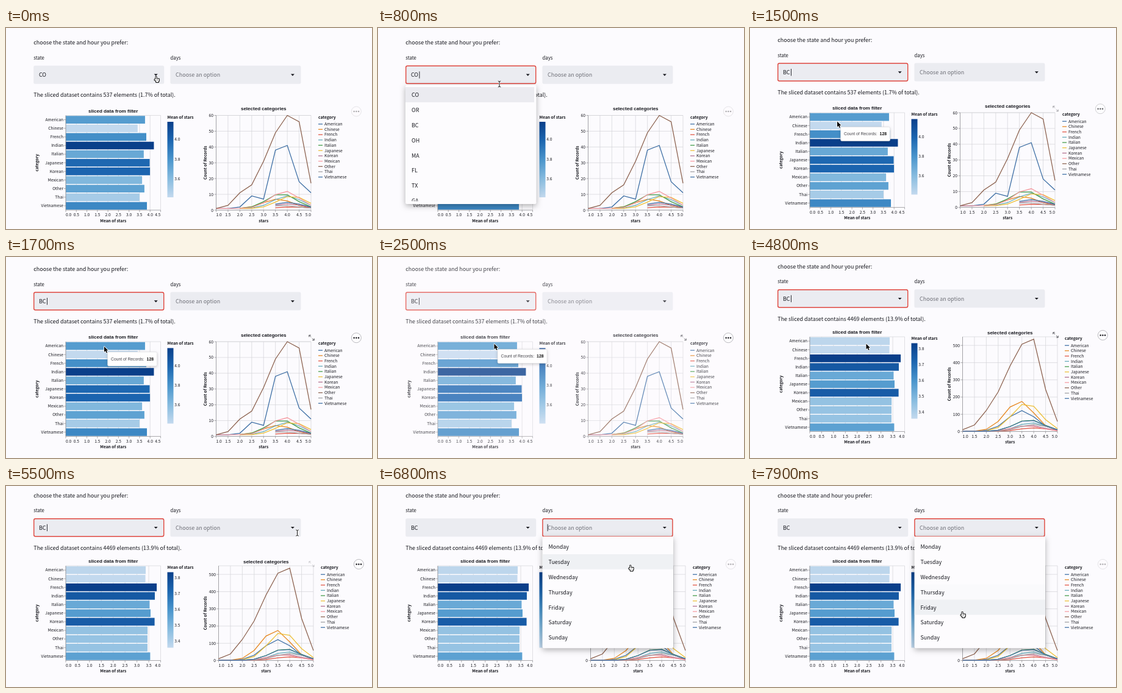
Write an HTML page with a canvas that moves like this. It is 600 px wide and 330 px high and loops after 8 s.

```html
<!DOCTYPE html>
<html lang="en">
<head>
<meta charset="utf-8">
<title>Restaurant dashboard</title>
<style>
html, body { margin: 0; width: 100%; height: 100%; overflow: hidden; background: #fcfbfe; }
canvas { display: block; width: 600px; height: 330px; }
</style>
</head>
<body>
<canvas id="stage"></canvas>
<script>
const W = 600, H = 330, LOOP = 8000, STEP = 100;
const canvas = document.getElementById('stage');
const ctx = canvas.getContext('2d');
const ratio = window.devicePixelRatio || 1;
canvas.width = W * ratio;
canvas.height = H * ratio;

const SANS = '"Noto Sans CJK JP", "Noto Sans CJK SC", "Noto Sans CJK KR", "Open Sans", sans-serif';
const ARIAL = '"Liberation Sans", Arial, sans-serif';
const BODY = '8.95px ' + SANS, LABEL = '7.8px ' + SANS;
const SMALL = '6.7px ' + SANS, SMALL_BOLD = 'bold 6.65px ' + SANS;
const TITLE = 'bold 8.05px ' + ARIAL;
const BG = '#fcfbfe', INK = '#16171d', RED = '#e0463e', FIELD = '#ebecf1';
const GRID = '#d3d3d7', AXIS = '#88888c';

const CATS = ['American', 'Chinese', 'French', 'Indian', 'Italian', 'Japanese',
  'Korean', 'Mexican', 'Other', 'Thai', 'Vietnamese'];
const COLORS = ['#3a6ca3', '#e6851c', '#e0513f', '#62a9b8', '#3f9a46',
  '#edbe33', '#b06c8c', '#f799a0', '#8a5f4c', '#9f9fa3'];
const BLUES = ['c3d9ee', '86bbdf', '4a95cc', '1c66b0', '0a3f8a'];
const STATES = ['CO', 'OR', 'BC', 'OH', 'MA', 'FL', 'TX', 'GA'];
const DAYS = ['Monday', 'Tuesday', 'Wednesday', 'Thursday', 'Friday', 'Saturday', 'Sunday'];

// Counts per half star: a bell on a floor of one; rare categories start late.
function bell(amp, peak) {
  const start = amp < 5 ? 5 : amp < 11 ? 2 : 0;
  const points = [];
  for (let i = start; i <= 8; i++) {
    const d = (1 + i / 2 - peak) / 0.85;
    points.push([i, 1 + amp * Math.exp(-d * d)]);
  }
  return points;
}
const counts = (...values) => values.map((v, i) => [i, v]);

const CO = {
  status: 'The sliced dataset contains 537 elements (1.7% of total).',
  means: [3.76, 3.41, 3.82, 4.18, 3.7, 3.98, 3.995, 3.62, 3.73, 3.5, 3.85],
  maxX: 4.5, legend: [4, 3.8, 3.6], maxY: 60, stepY: 10, dx: 0,
  lines: [
    counts(1, 1, 2, 9, 7, 38, 41, 18, 11), bell(6, 3.6), bell(1, 4.2), bell(8, 4), bell(9.5, 3.75),
    bell(8, 4.2), bell(3, 4), bell(11, 3.9), counts(1, 3, 11, 16, 31, 49, 60, 56, 17), bell(2, 3.8), bell(4, 4)
  ]
};
const BC = {
  status: 'The sliced dataset contains 4469 elements (13.9% of total).',
  means: [3.37, 3.358, 3.835, 3.755, 3.535, 3.575, 3.745, 3.45, 3.445, 3.445, 3.56],
  maxX: 4, legend: [3.8, 3.7, 3.6, 3.5, 3.4], maxY: 550, stepY: 100, dx: 4,
  lines: [
    bell(120, 3.5), bell(176, 3.4), bell(20, 4), bell(50, 3.9), bell(68, 3.8),
    bell(165, 3.7), bell(34, 3.8), bell(32, 3.7), counts(10, 38, 122, 230, 380, 507, 536, 245, 58),
    bell(40, 4), bell(66, 3.8)
  ]
};

// Cursor track: time, x, y of the hot spot.
const TRACK = [
  [300, 246, 79], [800, 199, 92], [1250, 125, 160], [1350, 125, 160], [1650, 161, 147],
  [1900, 161, 147], [2300, 190.5, 142.5], [4800, 190.5, 142.5], [5400, 477.5, 77],
  [5900, 477.5, 77], [7700, 350, 182], [7900, 348, 206]
];
const OPEN1 = 400, PICK = 1400, RELOAD = 4800, OPEN2 = 6000;

const clamp = v => Math.max(0, Math.min(1, v));

function cursorAt(t) {
  const i = Math.max(1, TRACK.findIndex(k => t <= k[0]));
  const [t0, x0, y0] = TRACK[i - 1], [t1, x1, y1] = TRACK[i];
  const u = clamp((t - t0) / (t1 - t0)), e = u * u * (3 - 2 * u);
  return { x: x0 + (x1 - x0) * e, y: y0 + (y1 - y0) * e };
}

function blue(u) {
  const p = clamp(u) * (BLUES.length - 1), i = Math.min(Math.floor(p), BLUES.length - 2);
  const part = (s, k) => parseInt(s.slice(k, k + 2), 16);
  const mix = k => Math.round(part(BLUES[i], k) + (part(BLUES[i + 1], k) - part(BLUES[i], k)) * (p - i));
  return `rgb(${mix(0)},${mix(2)},${mix(4)})`;
}

function text(str, x, y, font, color = INK, align = 'left') {
  ctx.font = font;
  ctx.fillStyle = color;
  ctx.textAlign = align;
  ctx.fillText(str, x, y);
}

function turned(str, x, y) {
  ctx.save();
  ctx.translate(x, y);
  ctx.rotate(-Math.PI / 2);
  text(str, 0, 2.3, SMALL_BOLD, INK, 'center');
  ctx.restore();
}

function path(points, color, width, close) {
  ctx.beginPath();
  points.forEach(([x, y], i) => i ? ctx.lineTo(x, y) : ctx.moveTo(x, y));
  if (close) ctx.closePath();
  ctx.strokeStyle = color;
  ctx.lineWidth = width;
  ctx.stroke();
}

const line = (x0, y0, x1, y1, color, width = 0.7) => path([[x0, y0], [x1, y1]], color, width);

function box(x, y, w, h, r, fill) {
  ctx.beginPath();
  ctx.roundRect(x, y, w, h, r);
  ctx.fillStyle = fill;
  ctx.fill();
}

function shadowed(x, y, w, h, r, fill, blur, alpha) {
  ctx.save();
  ctx.shadowColor = `rgba(0,0,0,${alpha})`;
  ctx.shadowBlur = blur * ratio;
  ctx.shadowOffsetY = blur * 0.3 * ratio;
  box(x, y, w, h, r, fill);
  ctx.restore();
}

function select(x, y, value, focus, caret) {
  box(x, y, 214, 30, 2.5, FIELD);
  if (focus) {
    ctx.beginPath();
    ctx.roundRect(x + 0.5, y + 0.5, 213, 29, 2.5);
    ctx.strokeStyle = RED;
    ctx.lineWidth = 1.4;
    ctx.stroke();
  }
  text(value || 'Choose an option', x + 8.7, y + 18.6, BODY, value ? INK : '#6f7078');
  if (caret) {
    const cx = x + 8.7 + (value ? ctx.measureText(value).width + 2 : 0);
    line(cx, y + 9.5, cx, y + 21, INK, 0.9);
  }
  ctx.beginPath();
  ctx.moveTo(x + 197.5, y + 13.7);
  ctx.lineTo(x + 203.5, y + 13.7);
  ctx.lineTo(x + 200.5, y + 16.9);
  ctx.fillStyle = INK;
  ctx.fill();
}

function menu(m, t) {
  const rowAt = time => Math.max(0, Math.floor((cursorAt(time).y - m.first) / 24.9));
  shadowed(m.x, m.top, 214.5, m.bottom - m.top, 2.5, '#fdfcfe', 10, 0.3);
  ctx.save();
  ctx.beginPath();
  ctx.rect(m.x, m.top, 214.5, m.clip - m.top);
  ctx.clip();
  const now = rowAt(t), before = rowAt(t - 2 * STEP);
  m.items.forEach((item, i) => {
    const y = m.first + i * 24.9;
    if (i === now || i === before) {
      ctx.globalAlpha = i === now ? 1 : 0.25;
      box(m.x, y, m.rowWidth, 24.9, 0, m.tint);
      ctx.globalAlpha = 1;
    }
    text(item, m.x + 10, y + 15.9, BODY);
  });
  ctx.restore();
}

function xLabels(from, to, left, y) {
  const n = Math.round((to - from) * 2);
  for (let i = 0; i <= n; i++) {
    const x = left + 155.5 * i / n;
    line(x, y, x, y + 3, AXIS);
    text((from + i / 2).toFixed(1), x, y + 10.4, SMALL, INK, i === 0 ? 'left' : i === n ? 'right' : 'center');
  }
}

function barChart(d, top) {
  const left = 98, size = 155.5, bottom = top + size, band = size / CATS.length;
  const lo = Math.min(...d.means), hi = Math.max(...d.means);
  for (let v = 0; v <= d.maxX; v += 0.5) {
    const x = left + size * v / d.maxX;
    line(x, top, x, bottom, GRID);
  }
  line(left, top, left + size, top, GRID);
  CATS.forEach((name, i) => {
    const y = top + band * i, mid = y + band / 2;
    box(left, y + 0.8, size * d.means[i] / d.maxX, band - 1.5, 0, blue((d.means[i] - lo) / (hi - lo)));
    line(left - 3, mid, left, mid, AXIS);
    text(name, 94, mid + 2.3, SMALL, INK, 'right');
  });
  line(left, top, left, bottom, AXIS);
  line(left, bottom, left + size, bottom, AXIS);
  xLabels(0, d.maxX, left, bottom);
  text('sliced data from filter', left + size / 2, top - 4.6, TITLE, INK, 'center');
  text('Mean of stars', left + size / 2, bottom + 19.8, SMALL_BOLD, INK, 'center');
  turned('category', 51, top + size / 2);

  text('Mean of stars', 264.5, top + 5.2, SMALL_BOLD);
  const g = ctx.createLinearGradient(0, top + 134.5, 0, top + 10.5);
  BLUES.forEach((c, i) => g.addColorStop(i / (BLUES.length - 1), '#' + c));
  box(264.5, top + 10.5, 10, 124, 0, g);
  d.legend.forEach(v => {
    text(v.toFixed(1), 276.3, top + 13 + 124 * (hi - v) / (hi - lo), SMALL);
  });
}

function lineChart(d, top, titleY) {
  const left = 344.5 + d.dx, size = 155.5, right = left + size, bottom = top + size;
  const yOf = v => bottom - size * v / d.maxY;
  for (let i = 0; i <= 8; i++) line(left + size * i / 8, top, left + size * i / 8, bottom, GRID);
  line(left, top, right, top, GRID);
  for (let v = 0; v <= d.maxY; v += d.stepY) {
    line(left, yOf(v), right, yOf(v), GRID);
    line(left - 3, yOf(v), left, yOf(v), AXIS);
    text(String(v), left - 4.5, yOf(v) + 2.5, SMALL, INK, 'right');
  }
  line(left, top, left, bottom, AXIS);
  line(left, bottom, right, bottom, AXIS);
  xLabels(1, 5, left, bottom);
  const color = i => COLORS[i % COLORS.length];
  ctx.lineJoin = 'miter';
  d.lines.forEach((points, i) => {
    path(points.map(([k, v]) => [left + size * k / 8, yOf(v)]), color(i), 1.25);
  });
  text('selected categories', left + size / 2, titleY + 2.5, TITLE, INK, 'center');
  text('stars', left + size / 2, bottom + 19.8, SMALL_BOLD, INK, 'center');
  turned('Count of Records', 326.5, top + size / 2);

  const lx = 512 + d.dx;
  text('category', lx, top + 5.2, SMALL_BOLD);
  CATS.forEach((name, i) => {
    const y = top + 14.2 + i * 8.7;
    line(lx, y, lx + 7, y, color(i), 1.25);
    text(name, lx + 10, y + 2.3, SMALL);
  });
}

function moreButton(x, y, alpha) {
  ctx.globalAlpha = alpha;
  ctx.beginPath();
  ctx.arc(x, y, 8, 0, 7);
  ctx.fillStyle = '#fefdff';
  ctx.fill();
  ctx.strokeStyle = '#a8a8ac';
  ctx.lineWidth = 0.8;
  ctx.stroke();
  for (const dx of [-3.7, 0, 3.7]) {
    ctx.beginPath();
    ctx.arc(x + dx, y, 1.25, 0, 7);
    ctx.fillStyle = '#1c1c20';
    ctx.fill();
  }
  ctx.globalAlpha = 1;
}

function expandIcon(x, y, alpha) {
  ctx.globalAlpha = alpha;
  for (const s of [-1, 1]) {
    const p = (a, b) => [x + a * s, y + b * s];
    path([p(1, 1), p(4, 4)], '#55555a', 1);
    path([p(4.2, 1.2), p(4.2, 4.2), p(1.2, 4.2)], '#55555a', 1);
  }
  ctx.globalAlpha = 1;
}

function tooltip(x, y) {
  shadowed(x, y, 81, 23, 2, '#fffefe', 5, 0.2);
  ctx.strokeStyle = '#dcdce0';
  ctx.lineWidth = 0.6;
  ctx.stroke();
  text('Count of Records:', x + 5.5, y + 13.8, '6.75px ' + ARIAL, '#44444a');
  text('128', x + 75.5, y + 13.8, 'bold 6.9px ' + ARIAL, '#111', 'right');
}

function beam(x, y) {
  for (const [color, w] of [['#fff', 2.4], ['#111', 1]]) {
    line(x, y - 4, x, y + 4, color, w);
    for (const s of [-1, 1]) path([[x - 2.2, y + 5 * s], [x, y + 4 * s], [x + 2.2, y + 5 * s]], color, w);
  }
}

function arrow(x, y) {
  const tip = [[0, 0], [0, 9], [2.1, 7.1], [3.6, 10.4], [5.1, 9.7], [3.7, 6.6], [6.4, 6.4]];
  ctx.lineJoin = 'round';
  path(tip.map(([a, b]) => [x + a, y + b]), '#fff', 1.6, true);
  ctx.fillStyle = '#000';
  ctx.fill();
}

// Finger, thumb and palm share one dark outline.
function hand(x, y) {
  for (const [color, grow] of [['#111', 0.5], ['#fff', -0.4]]) {
    const part = (a, b, w, h) => box(x + a - grow, y + b - grow, w + 2 * grow, h + 2 * grow, 1.4, color);
    part(-1, 0.4, 2.1, 7);
    part(-2.9, 4.8, 3.6, 2.6);
    part(-1, 4, 6.4, 4.4);
    part(-0.6, 6, 5.2, 4.4);
  }
  for (const dx of [1.2, 2.8]) line(x + dx, y + 5.4, x + dx, y + 7.6, '#555', 0.5);
}

function cursorShape(t, y) {
  if (t < 500) return hand;
  if (t < PICK) return y < 95 ? beam : hand;
  if (t < 5300) return arrow;
  return t >= OPEN2 && y > 84 ? hand : beam;
}

function draw(t) {
  const late = t >= RELOAD, picked = t >= PICK;
  const d = late ? BC : CO;
  const dy = late ? -8.6 : picked ? -4.3 : 0;
  const top = late ? 131 : picked ? 139 : 143.5;
  const titleY = late ? 124 : picked ? 128 : 132;
  const blink = (t + 600) % 1000 < 500;
  const stateFocus = t >= 300 && t < OPEN2 - 100, daysFocus = t >= OPEN2 - 100;

  ctx.setTransform(ratio, 0, 0, ratio, 0, 0);
  ctx.fillStyle = BG;
  ctx.fillRect(0, 0, W, H);

  text('choose the state and hour you prefer:', 45.3, 27.2 + dy, BODY);
  text('state', 45.3, 52 + dy, LABEL);
  text('days', 269.5, 52 + dy, LABEL);
  select(45.2, 61.8 + dy, picked ? 'BC' : 'CO', stateFocus, stateFocus && blink);
  select(269.4, 61.8 + dy, '', daysFocus, daysFocus && blink);
  text(d.status, 45.3, 113.4 + dy, BODY);
  barChart(d, top);
  lineChart(d, top, titleY);

  const expand = clamp((t - 1400) / 200) * (1 - 0.75 * clamp((t - 5100) / 400)) * (1 - clamp((t - 5500) / 200));
  if (expand > 0) expandIcon(501, late ? 128 : 132.5, expand);

  // Stale content fades towards the page colour until new data arrives.
  if (!late && t > 2000) {
    ctx.globalAlpha = 0.67 * Math.pow(clamp((t - 2000) / 1000), 1.7);
    ctx.fillStyle = BG;
    ctx.fillRect(0, 0, W, H);
    ctx.globalAlpha = 1;
  }

  const hover = clamp((t - 1400) / 200) * (1 - clamp((t - 5900) / 400));
  moreButton(574.3 + d.dx, 137 + dy, 0.35 + 0.65 * hover);

  if (t >= OPEN1 && !picked) {
    menu({ x: 45, top: 93.5, bottom: 289, first: 97, clip: 284.2, rowWidth: 211, tint: '#ebebf0', items: STATES }, t);
  }
  if (t >= OPEN2) {
    menu({ x: 269.5, top: 82.8, bottom: 266.3, first: 87, clip: 266, rowWidth: 214.5, tint: '#eff1f4', items: DAYS }, t);
  }

  const c = cursorAt(t);
  if (t >= 1500 && t < RELOAD) tooltip(c.x + 5.6, c.y + 9);
  cursorShape(t, c.y)(c.x, c.y);
}

const begin = performance.now();
function tick() {
  const t = (performance.now() - begin) % LOOP;
  draw(Math.floor(t / STEP) * STEP);
  requestAnimationFrame(tick);
}
tick();
</script>
</body>
</html>
```
